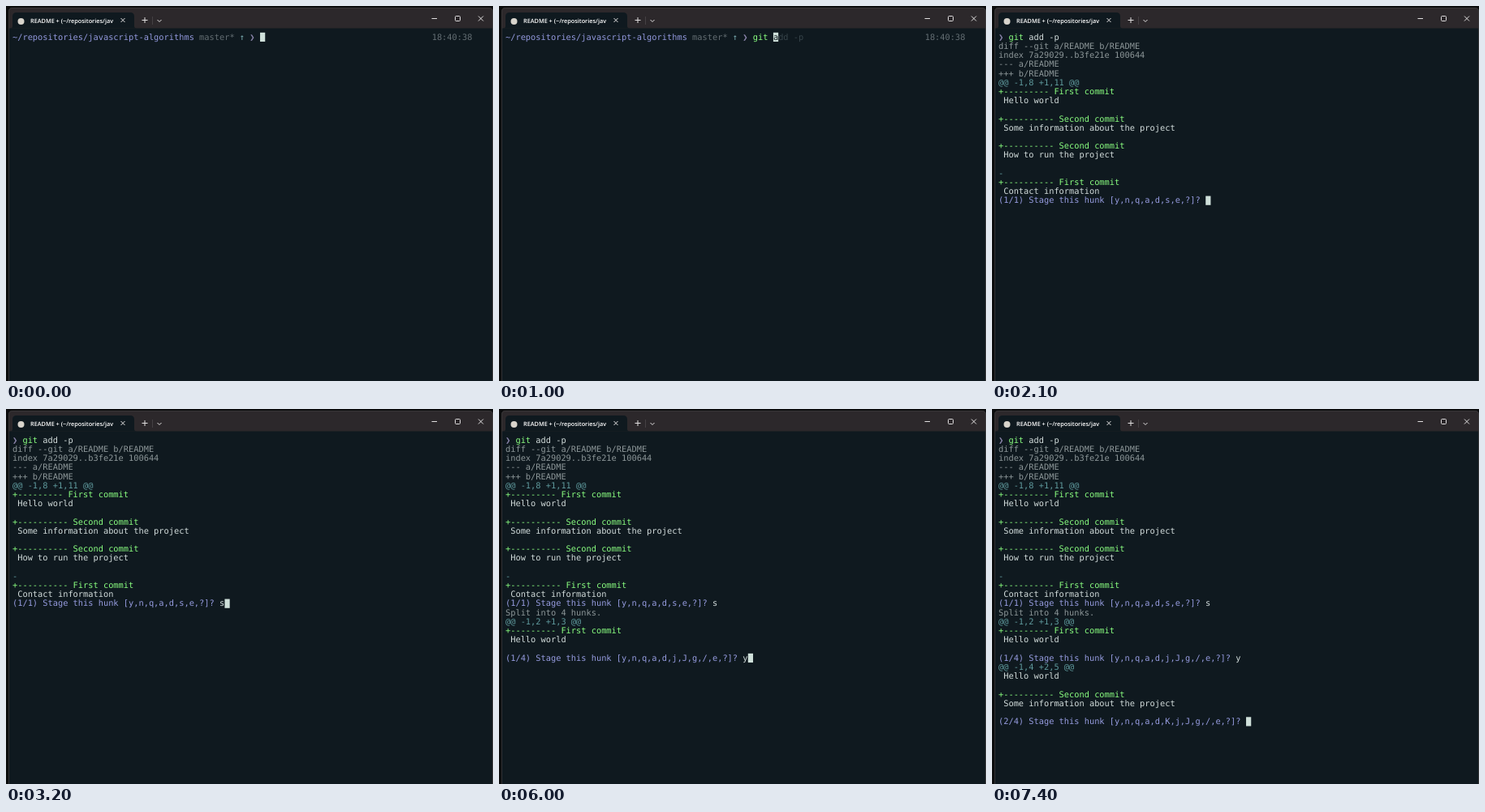
An HTML page for the animation above (8 s loop, 600 px wide and 463 px high).

```html
<!DOCTYPE html>
<html lang="en">
<head>
<meta charset="utf-8">
<title>Terminal: git add -p</title>
<style>
  html, body { margin: 0; width: 100%; height: 100%; overflow: hidden; background: #0b0c0d; }
  svg { display: block; }
  text { white-space: pre; text-rendering: geometricPrecision; }
  #screen { font: 10.34px "DejaVu Sans Mono", monospace; }
  .title { font: 600 7.3px "Open Sans", sans-serif; fill: #fff; }
  .icons { fill: none; stroke: #e2e0e1; }
  .path { fill: #9298dc; }
  .dim { fill: #646e73; }
  .meta { fill: #8d9799; }
  .hunk { fill: #5f9a9d; }
  .arrow { fill: #7fb3b8; }
  .chevron { fill: #8d87ae; }
  .add { fill: #8aff80; }
  .bad { fill: #ff9580; }
  .plain { fill: #d3dddc; }
  .ask { fill: #969ce0; }
  .ghost { fill: #37444a; }
  .cursor { fill: #cfe0da; }
  .under { fill: #0f191f; }
</style>
</head>
<body>
<svg width="600" height="463" viewBox="0 0 600 463">
  <path d="M3 463V7q0-5 5-5H595q5 0 5 5V463z" fill="#0f191f"/>
  <path d="M3 27.5V7q0-5 5-5H595q5 0 5 5V27.5z" fill="#2c282b"/>
  <path d="M3.5 463V7q0-4.5 4.5-4.5H595q4.5 0 4.5 4.5V463" fill="none" stroke="#3b3a3c" stroke-width=".8"/>
  <path d="M5 27.5q3 0 3-3V13q0-5 5-5H153q5 0 5 5V24.5q0 3 3 3z" fill="#0f191f"/>
  <circle cx="18.5" cy="19" r="4" fill="#d8d4cc"/>
  <clipPath id="tab"><path d="M28 8H132V28H28z"/></clipPath>
  <text class="title" x="30" y="20.8" clip-path="url(#tab)">README + (~/repositories/javascript-algorithms)</text>
  <g class="icons">
    <path d="M141.5 15l5 5m0-5l-5 5M167.5 17.5h7m-3.500-3.500v7M186.500 17l2.500 2.500 2.500-2.500M524.500 15.500h6.500M582 12.500l6 6m0-6l-6 6"/>
    <rect x="553.5" y="12.500" width="6" height="6" rx="1"/>
    <path d="M180.500 13v10" stroke="#454144"/>
  </g>
  <g id="screen"></g>
</svg>
<script>
const LOOP = 8000, CELL = 6.225, LINE = 11.21, LEFT = 8, TOP = 32.8, BASELINE = 8.9;
const COMMAND = 'git add -p';
const KEYS = [[600, 1], [800, 2], [900, 3], [1000, 4], [1500, 10]];
const screen = document.getElementById('screen');

// A line is a list of [style, text] runs.
const meta = text => [['meta', text]];
const hunk = text => [['hunk', text]];
const plain = text => [['plain', text]];
const added = (dashes, text) => [['add', '+' + '-'.repeat(dashes) + ' ' + text]];
const ask = (step, keys, answer = '') =>
  [['ask', `(${step}) Stage this hunk [y,n,q,a,d,${keys},e,?]? `], ['plain', answer]];
const blank = [];

const diff = [
  meta('diff --git a/README b/README'),
  meta('index 7a29029..b3fe21e 100644'),
  meta('--- a/README'),
  meta('+++ b/README'),
  hunk('@@ -1,8 +1,11 @@'),
  added(9, 'First commit'), plain(' Hello world'), blank,
  added(10, 'Second commit'), plain(' Some information about the project'), blank,
  added(10, 'Second commit'), plain(' How to run the project'), blank,
  hunk('-'),
  added(10, 'First commit'), plain(' Contact information'),
];
const firstHunk = [
  meta('Split into 4 hunks.'),
  hunk('@@ -1,2 +1,3 @@'),
  added(9, 'First commit'), plain(' Hello world'), blank,
];
const secondHunk = [
  hunk('@@ -1,4 +2,5 @@'),
  plain(' Hello world'), blank,
  added(10, 'Second commit'), plain(' Some information about the project'), blank,
];

function promptLine(typed) {
  const text = COMMAND.slice(0, typed);
  return [
    ['path', '~/repositories/javascript-algorithms'], ['dim', ' master*'],
    ['arrow', ' ↑'], ['chevron', ' ❯ '],
    [typed < 3 ? 'bad' : 'add', text.slice(0, 3)], ['plain', text.slice(3)],
  ];
}

function linesAt(t) {
  if (t < 2000) return [promptLine(typedAt(t))];
  const lines = [[['chevron', '❯ '], ['add', 'git'], ['plain', ' add -p']]];
  if (t < 2100) return [...lines, blank];
  lines.push(...diff, ask('1/1', 's', t >= 3200 ? 's' : ''));
  if (t >= 3900) lines.push(...firstHunk, ask('1/4', 'j,J,g,/', t >= 6000 ? 'y' : ''));
  if (t >= 7300) lines.push(...secondHunk, ask('2/4', 'K,j,J,g,/'));
  return lines;
}

const typedAt = t => KEYS.reduce((count, [at, n]) => t >= at ? n : count, 0);

const textAt = (row, col, runs) =>
  `<text x="${LEFT + col * CELL}" y="${TOP + BASELINE + row * LINE}">` +
  runs.map(([style, text]) => `<tspan class="${style}">${text}</tspan>`).join('') + '</text>';

function render(t) {
  const lines = linesAt(t), row = lines.length - 1;
  const col = lines[row].reduce((sum, run) => sum + run[1].length, 0);
  let out = lines.map((runs, i) => textAt(i, 0, runs)).join('');
  out += `<rect class="cursor" x="${LEFT + col * CELL}" y="${TOP + row * LINE}" width="${CELL}" height="${LINE}"/>`;
  if (t < 2000) {
    out += textAt(0, 83, [['dim', '18:40:38']]);
    const rest = t < 600 ? '' : COMMAND.slice(typedAt(t));
    out += textAt(0, col, [['under', rest.slice(0, 1)], ['ghost', rest.slice(1)]]);
  }
  return out;
}

let shown;
function tick(now) {
  const next = render(now % LOOP);
  if (next !== shown) screen.innerHTML = shown = next;
  requestAnimationFrame(tick);
}
tick(performance.now());
</script>
</body>
</html>
```
